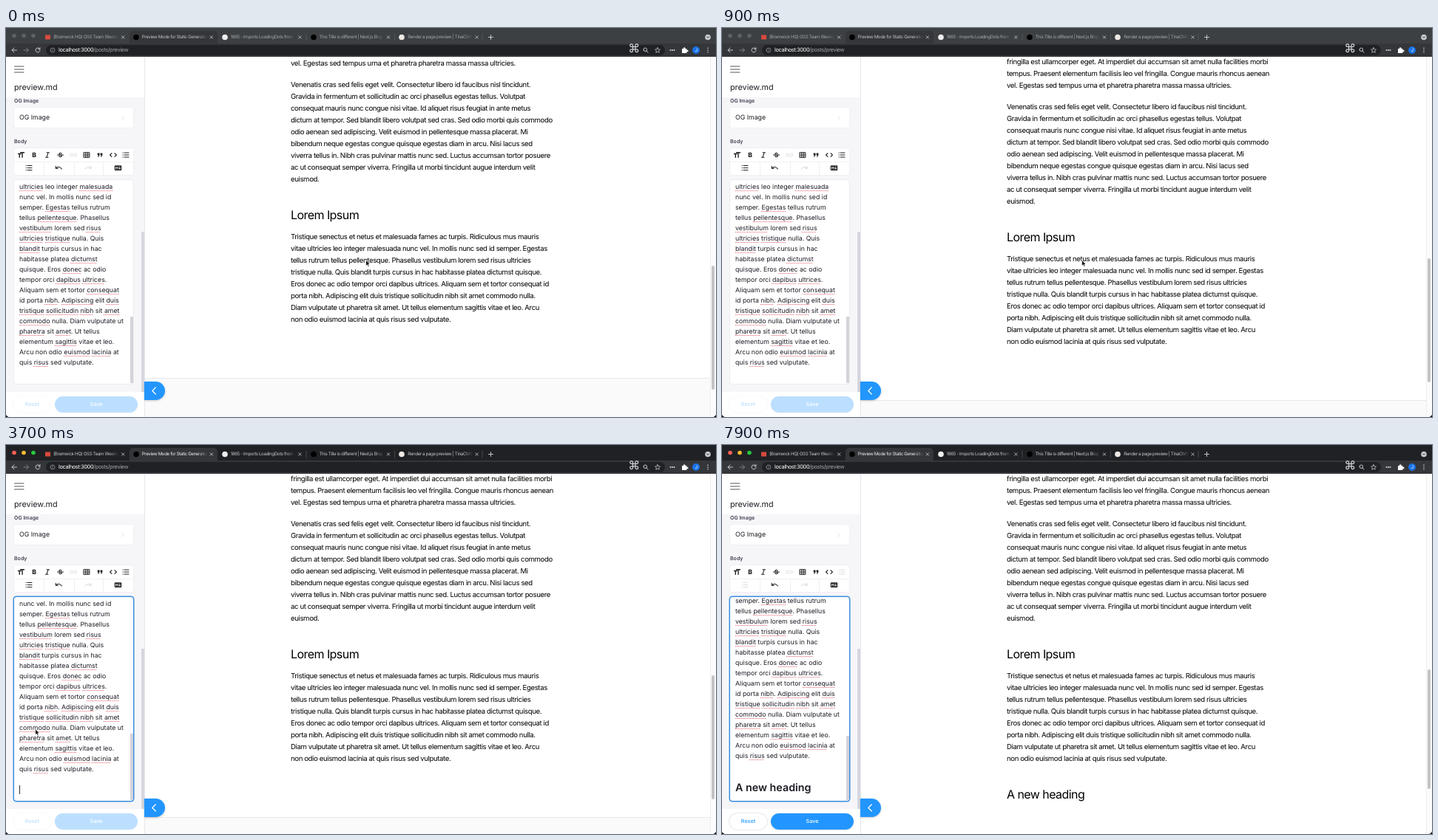
Write an HTML page that moves like this. It is 960x527 px and loops after 8 s.

```html
<!DOCTYPE html>
<html lang="en">
<head>
<meta charset="utf-8">
<title>Live page editing</title>
<style>
  html, body { margin: 0; width: 100%; height: 100%; overflow: hidden; background: #000; }
  #stage { position: absolute; left: 0; top: 0; width: 960px; height: 527px; overflow: hidden;
    background: #fff; border-radius: 0 0 5px 5px; color: #000;
    font-family: Inter, sans-serif; letter-spacing: -.024em; text-rendering: geometricPrecision; }
  #stage div, #stage svg { position: absolute; }
  .t { white-space: pre; }
  .form { color: #1c1b24; letter-spacing: 0; }
  #view { left: 0; top: 39px; width: 960px; height: 488px; overflow: hidden; }
  #page { left: 0; top: -39px; width: 960px; height: 0; }
  #side { left: 0; top: 39px; width: 187px; height: 488px; background: #f6f6f9; border-right: 1px solid #e6e6ec; }
  .box { background: #fff; border-radius: 3px; }
  #clip { left: 11px; top: 207px; width: 157px; height: 274px; overflow: hidden; }
  .bad { text-decoration: underline dotted #e4606a 1px; text-underline-offset: 1.5px; }
  #caret { left: 18px; top: 461px; width: 1px; height: 12px; background: #333; }
  #typed b { font-weight: 600; }
  #typed i { display: inline-block; width: 1px; height: 16px; background: #333; vertical-align: -3px; margin-left: 1px; }
  .pill { top: 499px; height: 22px; border-radius: 12px; text-align: center; font-weight: 500; font-size: 7.2px; line-height: 22px; }
  .tab { white-space: pre; overflow: hidden; width: 89px; height: 12px; line-height: 12px; font-size: 6.2px;
    -webkit-mask-image: linear-gradient(90deg, #000 84%, transparent); mask-image: linear-gradient(90deg, #000 84%, transparent); }
</style>
</head>
<body>
<div id="stage">
  <div id="view"><div id="page"></div></div>
  <div id="side"></div>
  <div id="form" class="form"></div>
  <div id="chrome" style="left:0;top:0;width:960px;height:39px"></div>
  <svg id="icons" width="960" height="527" viewBox="0 0 960 527" fill="none"></svg>
  <div id="menu" class="form box" style="left:11px;top:204px;width:81px;height:112px;box-shadow:0 1px 4px #0003"></div>
  <svg id="arrow" width="14" height="16" viewBox="0 0 14 16" style="left:0;top:0">
    <path d="M.7 .7V8.2L2.4 6.6 3.6 9.3 4.9 8.7 3.8 6.1H6Z" fill="#000" stroke="#fff" stroke-width=".6"/>
  </svg>
  <svg id="hand" width="14" height="16" viewBox="0 0 14 16" style="left:0;top:0">
    <path d="M2 1Q3 0 3.6 1V4L7.6 5Q8.6 5.4 8.3 7L7.6 10H3.3L.6 6.6Q.6 5.6 2 6.3Z" fill="#fff" stroke="#222" stroke-width=".8"/>
  </svg>
</div>
<script>
const $ = id => document.getElementById(id);

// Text block; y is the middle of its first line.
function text(parent, x, y, size, str, { lh = 16, css = '', id = '' } = {}) {
  parent.insertAdjacentHTML('beforeend',
    `<div class="t" id="${id}" style="left:${x}px;top:${y - lh / 2}px;font-size:${size}px;line-height:${lh}px;${css}">${str}</div>`);
}
function rect(parent, x, y, w, h, css, id = '') {
  parent.insertAdjacentHTML('beforeend',
    `<div id="${id}" style="left:${x}px;top:${y}px;width:${w}px;height:${h}px;${css}"></div>`);
}

// ---- Preview page
const page = $('page'), BODY = 9.6, HEAD = 16;
const headStyle = { lh: 20, css: 'letter-spacing:-.035em' };
rect(page, 198, -460, 744, 402, 'background:#ececec');
text(page, 385, -14, BODY, 'March 16, 2020');
text(page, 385, 15, BODY, `Lorem ipsum dolor sit amet, consectetur adipiscing elit, sed do eiusmod tempor
incididunt ut labore et dolore magna aliqua. Praesent elementum facilisis leo vel
fringilla est ullamcorper eget. At imperdiet dui accumsan sit amet nulla facilities morbi
tempus. Praesent elementum facilisis leo vel fringilla. Congue mauris rhoncus aenean
vel. Egestas sed tempus urna et pharetra pharetra massa massa ultricies.`);
text(page, 385, 108, BODY, `Venenatis cras sed felis eget velit. Consectetur libero id faucibus nisl tincidunt.
Gravida in fermentum et sollicitudin ac orci phasellus egestas tellus. Volutpat
consequat mauris nunc congue nisi vitae. Id aliquet risus feugiat in ante metus
dictum at tempor. Sed blandit libero volutpat sed cras. Sed odio morbi quis commodo
odio aenean sed adipiscing. Velit euismod in pellentesque massa placerat. Mi
bibendum neque egestas congue quisque egestas diam in arcu. Nisi lacus sed
viverra tellus in. Nibh cras pulvinar mattis nunc sed. Luctus accumsan tortor posuere
ac ut consequat semper viverra. Fringilla ut morbi tincidunt augue interdum velit
euismod.`);
text(page, 385, 283, HEAD, 'Lorem Ipsum', headStyle);
text(page, 385, 314, BODY, `Tristique senectus et netus et malesuada fames ac turpis. Ridiculous mus mauris
vitae ultricies leo integer malesuada nunc vel. In mollis nunc sed id semper. Egestas
tellus rutrum tellus pellentesque. Phasellus vestibulum lorem sed risus ultricies
tristique nulla. Quis blandit turpis cursus in hac habitasse platea dictumst quisque.
Eros donec ac odio tempor orci dapibus ultrices. Aliquam sem et tortor consequat id
porta nibh. Adipiscing elit duis tristique sollicitudin nibh sit amet commodo nulla.
Diam vulputate ut pharetra sit amet. Ut tellus elementum sagittis vitae et leo. Arcu
non odio euismod lacinia at quis risus sed vulputate.`);
text(page, 385, 473, HEAD, '', { ...headStyle, id: 'preview' });
rect(page, 188, 504, 772, 100, 'background:#fafafa;border-top:1px solid #e8e8e8', 'footer');
rect($('view'), 952, 0, 7, 488, 'background:#fcfcfc;border-left:1px solid #ededed');
rect($('view'), 954, 0, 4, 168, 'background:#c3c3c3;border-radius:2px', 'thumb');

// ---- Sidebar form
const form = $('form');
const white = 'background:#fff;border-radius:3px;box-shadow:0 0 0 .5px #ececf1';
const label = { css: 'font-weight:600;color:#433e52' };
rect(form, 0, 39, 187, 55, 'background:#fff');
text(form, 11, 81, 10.8, 'preview.md');
text(form, 11, 99, 7, 'OG Image', label);
rect(form, 11, 108, 161, 27, white);
text(form, 18, 122, 8.75, 'OG Image');
text(form, 11, 153.5, 7, 'Body', label);
rect(form, 11, 163, 161, 36, white);
rect(form, 11, 181, 161, 1, 'background:#f0f0f4');
for (const x of [51, 92, 131]) rect(form, x, 182, 1, 17, 'background:#f0f0f4');
rect(form, 10, 205, 161, 276, 'background:#fff;border:1px solid;border-radius:4px', 'area');

const misspelt = new RegExp('\\b(' + ('ultricies malesuada Egestas pellentesque vestibulum risus tristique blandit ' +
  'dictumst donec dapibus ultrices consequat nibh Adipiscing duis sollicitudin amet commodo pharetra ' +
  'sagittis euismod lacinia').split(' ').join('|') + ')\\b', 'g');
const copy = `ultricies leo integer malesuada
nunc vel. In mollis nunc sed id
semper. Egestas tellus rutrum
tellus pellentesque. Phasellus
vestibulum lorem sed risus
ultricies tristique nulla. Quis
blandit turpis cursus in hac
habitasse platea dictumst
quisque. Eros donec ac odio
tempor orci dapibus ultrices.
Aliquam sem et tortor consequat
id porta nibh. Adipiscing elit duis
tristique sollicitudin nibh sit amet
commodo nulla. Diam vulputate ut
pharetra sit amet. Ut tellus
elementum sagittis vitae et leo.
Arcu non odio euismod lacinia at
quis risus sed vulputate.`;
form.insertAdjacentHTML('beforeend', '<div id="clip"></div><div id="caret"></div>');
text($('clip'), 7, 9, 8.75, copy.replace(misspelt, '<span class="bad">$1</span>'), { lh: 14, id: 'copy' });
text(form, 18, 465, 14.3, '<b></b><i></i>', { lh: 20, id: 'typed' });
rect(form, 168, 391, 4, 90, 'background:#d3d3da', 'areaThumb');
rect(form, 183, 276, 4, 217, 'background:#d6d6df');
rect(form, 0, 493, 187, 34, 'background:#fff');
form.insertAdjacentHTML('beforeend', `
  <div id="reset" class="pill" style="left:10px;width:51px;color:#2296fe;box-shadow:0 0 2px #0004">Reset</div>
  <div id="save" class="pill" style="left:66px;width:112px;color:#fff;background:#2296fe;box-shadow:0 1px 2px #0002">Save</div>
  <div style="left:187px;top:479px;width:28px;height:25px;border-radius:0 13px 13px 0;background:#2296fe;box-shadow:0 1px 3px #0003"></div>`);

// ---- Heading menu
for (let n = 1; n <= 6; n++) {
  const y = 9 + (n - 1) * 18.2;
  text($('menu'), 7, y, 8.75, `Heading ${n}`, { id: 'h' + n });
  text($('menu'), 51, y, 5.8, `⌘-⌥-${n}`, { css: 'color:#c9c9d2;font-family:Inter,"DejaVu Sans",sans-serif' });
}

// ---- Browser chrome
const chrome = $('chrome');
rect(chrome, 0, 0, 960, 21, '', 'strip');
rect(chrome, 167, 4, 119, 17, 'background:#35363a;border-radius:5px 5px 0 0');
rect(chrome, 0, 21, 960, 18, 'background:#35363a');
rect(chrome, 54, 23, 837, 14, 'background:#202124;border-radius:7px');
const tabs = ['(Bramwick HQ) OSS Team Weekly', 'Preview Mode for Static Generation',
  '1865 - Imports LoadingDots from', 'This Title is different | Next.js Blog', 'Render a page preview | TinaCMS'];
tabs.forEach((title, i) => chrome.insertAdjacentHTML('beforeend',
  `<div class="tab" style="left:${64 + i * 119.8}px;top:6.5px;color:${i === 1 ? '#f1f1f1' : '#c4c7cc'}">${title}</div>`));
text(chrome, 71, 30, 7.45, '<span style="color:#fff">localhost:3000</span>/posts/preview', { lh: 12, css: 'color:#a0a4a9' });

// ---- Icons
const line = (d, color = '#222', w = 1, id = '') =>
  `<path id="${id}" d="${d}" stroke="${color}" stroke-width="${w}" stroke-linecap="round" stroke-linejoin="round"/>`;
const dot = (x, y, r, color, cls = '') => `<circle class="${cls}" cx="${x}" cy="${y}" r="${r}" fill="${color}"/>`;
const glyph = (x, y, str, font, color = '#222') =>
  `<text x="${x}" y="${y}" text-anchor="middle" style="font:${font}" fill="${color}">${str}</text>`;
const light = '#d5d7da', pale = '#dcdce3';
const bullets = (x, y) => [-3, 0, 3].map(d =>
  `M${x - 4} ${y + d}h.3M${x - 2} ${y + d}h6`).join('');
let art = [11, 24, 37].map(x => dot(x, 10.5, 2.8, '', 'light')).join('');
art += `<rect x="53" y="9.5" width="7" height="6" fill="#d9493d"/>`;
art += dot(176, 12.5, 3.8, '#000') + dot(296, 12.5, 3.8, '#eee') + dot(416, 12.5, 3.8, '#000') + dot(535, 12.5, 3.8, '#efe9e4');
for (let i = 0; i < 5; i++) art += line(`M${156.5 + i * 119.6} 10.8l3.4 3.4m0-3.4l-3.4 3.4`, light, .8);
art += line('M406 8v9M525.5 8v9M644 8v9', '#5f6368', .6);
art += line('M652.5 12.5h6M655.5 9.5v6', light, .9);
art += dot(949, 12.5, 3.8, '#c9cbce') + line('M947.5 11.8l1.5 1.5 1.5-1.5', '#202124', .9);
art += line('M14.5 30h-6.5m3-3l-3 3 3 3', light, .9) + line('M24 30h6.5m-3-3l3 3-3 3', '#85888c', .9);
art += line('M45.7 28.5a3 3 0 1 0 .3 2M46 26.5v2.3h-2.3', light, .9);
art += line('M60 30a3 3 0 1 0 6 0a3 3 0 1 0-6 0M63 29.8v1.6M63 28.4v.1', '#a0a4a9', .7);
art += glyph(849, 33, '⌘', '8.5px "DejaVu Sans",sans-serif', light);
art += line('M862 29.3a2.3 2.3 0 1 0 4.6 0a2.3 2.3 0 1 0-4.6 0M866 31l2 2.3', light, .9);
art += line('M881 26.6l1 2.3 2.5.2-1.9 1.7.6 2.5-2.2-1.3-2.2 1.3.6-2.5-1.9-1.7 2.5-.2z', light, .7);
art += dot(898.5, 30, 1, light) + dot(901, 30, 1, light) + dot(903.5, 30, 1, light);
art += `<path d="M914 28h2a1.3 1.3 0 1 1 2.4 0h2v2a1.3 1.3 0 1 1 0 2v2h-6.4z" fill="#fff"/>`;
art += dot(933, 30, 5, '#1a73e8') + glyph(933, 32.4, 'J', '6.5px Roboto,sans-serif', '#fff');
art += [27.3, 30, 32.7].map(y => dot(949, y, .8, light)).join('');
// form icons
art += line('M11.5 52h12.5M11.5 56h12.5M11.5 60h12.5', '#555', 1);
art += line('M157 119.5l2.5 2.5-2.5 2.5', '#e3e3e9', 1);
art += line('M16.5 170.5h3.6M18.3 170.5v4.8M19.5 168.7h5M22 168.7v6.6', '#222', 1.4, 'sizer');
art += glyph(38, 175, 'B', '800 8.6px Inter,sans-serif');
art += line('M55 168.8h3.5M53.5 175.2h3.5M57 168.8l-2 6.4', '#222', 1.1);
art += glyph(73.3, 175, 'S', '700 8.4px Inter,sans-serif') + line('M69.5 172h8', '#222', 1);
art += line('M90 170.2h-1.5a1.8 1.8 0 0 0 0 3.6h1.5M92.3 170.2h1.5a1.8 1.8 0 0 1 0 3.6h-1.5M89.7 172h3', pale, .9);
art += line('M105.3 168.5h7.6v7h-7.6zM105.3 170.9h7.6M105.3 173.2h7.6M107.8 168.5v7M110.4 168.5v7', '#222', .9);
art += `<path d="M123.7 169.5h2.8v2.6l-1.2 2.4h-1.3l.9-2.2h-1.2zM127.6 169.5h2.8v2.6l-1.2 2.4h-1.3l.9-2.2h-1.2z" fill="#222"/>`;
art += line('M143 169.6l-2.4 2.4 2.4 2.4M147 169.6l2.4 2.4-2.4 2.4', '#222', 1.1);
art += line(bullets(162, 172), '#222', 1.1, 'ul') + line(bullets(31, 189.5), '#222', 1, 'ol');
art += line('M67.3 187.3v3h3M67.6 190q4-4 7.8 1', '#222', 1.1);
art += line('M115.2 187.3v3h-3M114.9 190q-4-4-7.8 1', pale, 1.1);
art += `<rect x="146.8" y="186.3" width="9.4" height="6.6" rx="1" fill="#222"/>` +
  line('M148.5 191.2v-3l1.3 1.5 1.3-1.5v3M153.7 188v3M152.5 190l1.2 1.2 1.2-1.2', '#fff', .8);
art += line('M202.3 487l-4.5 4.5 4.5 4.5', '#fff', 1.2);
$('icons').innerHTML = art;

// ---- Timeline
const FOCUS = 1650, ENTER = 2700, OPEN = 4250, PICK = 5200, TYPE = 6200, DONE = 7380;
const scrollSteps = [[0, -30], [100, 10], [250, 130], [400, 192], [530, 201], [650, 150], [780, 40], [860, 5], [900, 0]];
const pathX = [[1000, 486], [1550, 47], [3450, 47], [4150, 20], [4400, 20], [4780, 36], [5100, 37]];
const pathY = [[1000, 314], [1550, 473], [3450, 473], [4150, 171], [4400, 171], [4780, 224], [5100, 229]];

function track(steps, t, ease = u => u) {
  if (t <= steps[0][0]) return steps[0][1];
  for (let i = 1; i < steps.length; i++) {
    const [t0, a] = steps[i - 1], [t1, b] = steps[i];
    if (t <= t1) return a + (b - a) * ease((t - t0) / (t1 - t0));
  }
  return steps.at(-1)[1];
}
const smooth = u => u * u * (3 - 2 * u);
const show = (id, on) => { $(id).style.visibility = on ? 'visible' : 'hidden'; };

function typedCount(t) {
  if (t < TYPE) return 0;
  if (t < 6330) return 1;
  if (t < 6480) return 2;
  return Math.min(13, 3 + Math.floor((t - 6480) / 90));
}

function draw(t) {
  const focused = t >= FOCUS, heading = t >= PICK, count = typedCount(t);
  const typed = 'A new heading'.slice(0, count);

  const offset = Math.round(track(scrollSteps, t));
  page.style.transform = `translateY(${offset}px)`;
  $('thumb').style.top = (count ? 265 : 273 - offset * .347) + 'px';
  $('thumb').style.height = (count ? 162 : 168) + 'px';
  $('footer').style.top = (count ? 551 : 504) + 'px';
  $('preview').textContent = typed;

  $('strip').style.background = focused ? '#202124' : '#3c4043';
  document.querySelectorAll('.tab').forEach(el => { el.style.opacity = focused ? 1 : .75; });
  document.querySelectorAll('.light').forEach((el, i) =>
    el.setAttribute('fill', focused ? ['#ff5f57', '#febc2e', '#28c840'][i] : '#5f6064'));

  $('area').style.borderColor = focused ? '#3a8de0' : '#ececf1';
  $('area').style.boxShadow = focused ? '0 0 0 .5px #3a8de0' : 'none';
  $('copy').style.transform = `translateY(${heading ? -32 : t >= ENTER ? -14 : 0}px)`;
  $('areaThumb').style.top = (heading ? 394 : 391) + 'px';
  $('areaThumb').style.height = (heading ? 87 : 90) + 'px';
  const lastAction = [DONE, PICK, ENTER, FOCUS].find(a => t >= a) ?? 0;
  const typing = t >= TYPE && t < DONE;
  const blink = focused && (typing || (t - lastAction) % 1000 < 500);
  show('caret', blink && !heading);
  $('typed').firstChild.textContent = typed;
  $('typed').lastChild.style.visibility = blink && heading ? 'visible' : 'hidden';

  const open = t >= OPEN && !heading;
  show('menu', open);
  $('sizer').setAttribute('stroke', open ? '#2b86dc' : '#222');
  $('h1').style.color = open && t > 4550 && t < 4900 ? '#2b78c8' : '';
  $('h2').style.color = open && t > 4760 ? '#1f4f8a' : '';
  for (const id of ['ul', 'ol']) $(id).setAttribute('stroke', heading ? pale : '#222');
  for (const id of ['reset', 'save']) $(id).style.opacity = heading ? 1 : .3;

  const pointer = t >= 3950;
  show('arrow', !pointer);
  show('hand', pointer && t < TYPE);
  const at = `translate(${track(pathX, t, smooth)}px,${track(pathY, t, smooth)}px)`;
  $('arrow').style.transform = $('hand').style.transform = at;
}

const start = performance.now();
function tick() {
  draw((performance.now() - start) % 8000);
  requestAnimationFrame(tick);
}
tick();
</script>
</body>
</html>
```
